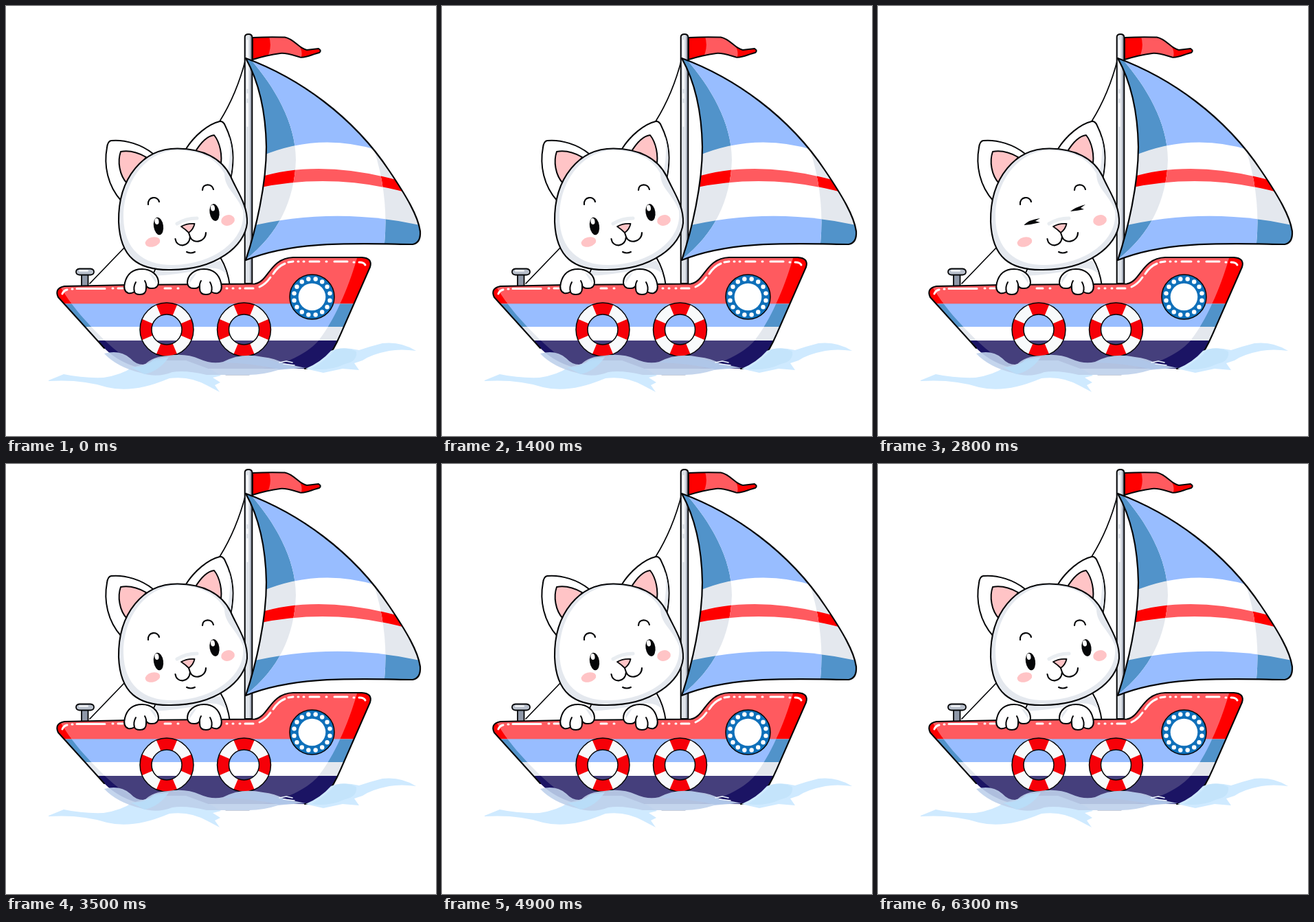
An HTML page with a canvas for the animation above (7000 ms loop, 626 by 626 pixels).

```html
<!DOCTYPE html>
<html lang="en">
<head>
<meta charset="utf-8">
<title>Kitten in a sailing boat</title>
<style>
html, body { margin: 0; width: 100%; height: 100%; overflow: hidden; background: #fff; }
canvas { display: block; }
</style>
</head>
<body>
<canvas id="stage" width="626" height="626"></canvas>
<script>
const ctx = document.getElementById('stage').getContext('2d');
const LOOP = 7000, STEP = 700, LIFT = 33;
const INK = '#050608', GREY = '#e4e8ee', PINK = '#ffc4c6', FOAM = '#cfeaff';
const LIGHT = { red: '#ff5a5f', blue: '#98bdff', white: '#fff', navy: '#453f7c' };
const DARK = { red: '#ff0000', blue: '#5193ca', white: GREY, navy: '#1b1464' };

function fill(d, color) {
  ctx.fillStyle = color;
  ctx.fill(new Path2D(d));
}

function line(d, width = 2, color = INK) {
  ctx.strokeStyle = color;
  ctx.lineWidth = width;
  ctx.stroke(new Path2D(d));
}

function shape(d, color, width = 2) {
  fill(d, color);
  line(d, width);
}

function within(d, draw) {
  ctx.save();
  ctx.clip(new Path2D(d));
  draw();
  ctx.restore();
}

function oval(x, y, rx, ry, tilt, color, edge = 0) {
  ctx.beginPath();
  ctx.ellipse(x, y, rx, ry, tilt, 0, 7);
  ctx.fillStyle = color;
  ctx.fill();
  if (edge) {
    ctx.strokeStyle = INK;
    ctx.lineWidth = edge;
    ctx.stroke();
  }
}

function mast() {
  const d = 'M347.7 404V45Q348 41 353 41Q358 41 358.3 45V404Z';
  fill(d, '#a9b0bd');
  within(d, () => {
    fill('M347 40H355V405H347Z', '#dfe3e9');
    line('M351.5 50V120M351.5 128V134M351.5 142V175', 2, '#fff');
  });
  line(d);
}

function flag() {
  const d = 'M359 46C376 45 392 45 406 45.5C420 48 426 62 438 64L455 62Q460 65 456 68C446 70 437 76 428 74.5' +
    'C416 71 409 68 399 69C384 71 372 74 359 78Z';
  fill(d, LIGHT.red);
  within(d, () => {
    fill('M355 40H381Q390 58 378 80H355Z', DARK.red);
    fill('M426 57Q434 67 428 80H470V57Z', DARK.red);
  });
  line(d);
}

function sailBands(c) {
  fill('M340 70H620V400H340Z', c.white);
  fill('M340 70H560L542 210Q455 183 370 219L340 230Z', c.blue);
  fill('M366 250Q455 222 572 254L585 272Q475 242 366 265Z', c.red);
  fill('M350 322Q480 290 612 321V380H340Z', c.blue);
}

function sail() {
  const d = 'M349 76C425 104 505 160 558 240C583 277 600 306 603 328Q604 345 592 347' +
    'C510 346 420 341 349 370C364 325 379 260 379 205C378 150 368 110 349 76Z';
  within(d, () => {
    sailBands(DARK);
    within('M349 70C388 112 422 168 422 224C420 285 395 335 345 372L560 400' +
      'Q551 350 551 345Q558 270 531 195L540 60Z', () => sailBands(LIGHT));
  });
  line(d, 2.2);
}

function ears() {
  shape('M214 215C198 202 174 194 153 196Q148 197 147 206C142 232 148 262 168 284Z', '#fff');
  shape('M204 220C190 212 178 210 167 212C162 226 165 246 176 258Z', PINK);
  shape('M262 208C274 189 294 172 311 168Q316 167 319 174C332 200 333 224 327 252Z', '#fff');
  fill('M325 190C331 212 330 230 327 248L323 240Q328 214 325 190Z', GREY);
  shape('M275 213C284 198 294 189 303 188C311 198 316 217 312 235Z', PINK);
}

function head() {
  const d = 'M250 207.5C286 208 314 221 327 248C337 271 352 290 351 316C348 349 306 384 240 384' +
    'C192 385 166 366 164 314C163 250 200 207 250 207.5Z';
  fill(d, GREY);
  within(d, () => {
    fill('M250 210C284 211 306 222 318 244C318 266 335 272 345 298C350 340 303 376 244 377' +
      'C201 378 172 356 171 308C171 252 207 210 250 210Z', '#fff');
    line('M249 317Q262 309 278 309', 5, '#e9edf1');
  });
  line(d, 2.1);
}

function eyes(closed) {
  if (closed) {
    fill('M212 319Q220 311 236 309L229 313L236 315Q225 318 212 319Z', INK);
    fill('M280 299Q287 293 302 289L295 294L300 296Q291 298 280 299Z', INK);
    return;
  }
  oval(222, 320.5, 7, 12.8, -0.15, INK);
  oval(219.5, 313.5, 3, 4.5, -0.15, '#fff');
  oval(303.5, 300.5, 7, 12.5, -0.15, INK);
  oval(301, 294, 3, 4.5, -0.15, '#fff');
}

function face(closed) {
  oval(213.5, 343.5, 11, 7, -0.25, PINK);
  oval(323, 312, 10, 7.8, -0.25, PINK);
  line('M207 289C206 277 221 276 223 285M286 268C286 258 300 258 302 267', 2.2);
  eyes(closed);
  shape('M255 321Q264 316 274.5 317Q273 325 266 330Q261 325 255 321Z', PINK, 1.8);
  line('M266 330L268 336M246.5 339C248 352 267 352 268 336C272 347 291 344 291 330M263 358Q269 361 275 358', 2.1);
}

function paw() {
  shape('M204 411Q204 420 195 420Q188 420 187 416Q183 419 178 418Q170 415 173 403C176 391 183 383 198 383' +
    'C212 383 222 392 222 403Q221 412 211 411Q206 411 204 407Z', '#fff');
  fill('M208 388Q220 394 219 404Q214 397 208 388Z', GREY);
  line('M187 416Q185 409 189 402M204 411Q205 405 202 400');
}

function paws() {
  paw();
  ctx.save();
  ctx.translate(486, 0);
  ctx.scale(-1, 1);
  paw();
  ctx.restore();
}

function cleat() {
  shape('M110 391H119.5V408H110Z', '#8f98a8', 1.8);
  shape('M107 382.5H123Q128 383 128 387Q128 391 123 391.5H107Q102 391 102 387Q102 383 107 382.5Z', '#b9c0cc', 1.8);
  line('M107 385.5H119', 2, '#fff');
}

function hullBands(c) {
  [['red', 360, 433.5], ['blue', 433.5, 467], ['white', 467, 487], ['navy', 487, 545]].forEach(([name, top, end]) => {
    ctx.fillStyle = c[name];
    ctx.fillRect(60, top, 490, end - top);
  });
}

function hull() {
  // The rim stays open at the waterline, so no ink shows under the waves.
  const rim = 'M143 498L76 424Q70 411 85 408L180 406L362 404.5C382 402 384 367 418 366H518Q534 367 530 380L487 478' +
    'C474 508 462 527 435 528';
  within(rim + 'H200Q166 521 143 498Z', () => {
    hullBands(DARK);
    within('M74 400C96 440 122 465 145 488C170 512 190 522 220 532H350C405 525 440 505 455 487' +
      'C478 458 500 408 513 360H300Z', () => hullBands(LIGHT));
  });
  line(rim, 2.1);
  line('M82 419Q84 414 89 413M96 412H97M103 411.5H144M155 411H156M163 411H170M231 411H240M250 411H251' +
    'M321 411H322M330 411H331M340 411H341M348 411H360M369 409Q378 405 385 395M389 390Q396 379 406 375M411 373L418 372' +
    'M425 372H426M433 372H434M442 372H456M466 372H467M478 372H497M506 373H507M514 373Q521 373 523 377', 3, '#fff');
}

function ring(x, y) {
  ctx.lineWidth = 17;
  ctx.lineCap = 'butt';
  ctx.strokeStyle = '#f8fafb';
  ctx.beginPath();
  ctx.arc(x, y, 30.5, 0, 7);
  ctx.stroke();
  ctx.strokeStyle = '#f60008';
  for (let i = 0; i < 4; i++) {
    const a = i * Math.PI / 2;
    ctx.beginPath();
    ctx.arc(x, y, 30.5, a - 0.4, a + 0.4);
    ctx.stroke();
  }
  ctx.lineCap = 'round';
  [22, 39].forEach(r => oval(x, y, r, r, 0, 'transparent', 1.5));
}

function porthole(x, y) {
  oval(x, y, 32.5, 32.5, 0, '#0f70ba', 1.5);
  oval(x, y, 19.8, 19.8, 0, '#fff');
  for (let i = 0; i < 16; i++) {
    const a = (i + 0.5) * Math.PI / 8;
    oval(x + 26.5 * Math.cos(a), y + 26.5 * Math.sin(a), 3.2, 3.2, 0, '#fff');
  }
}

function waves() {
  fill('M62 545L84 536Q112 542 142 541Q168 537 184 526L222 516L262 516L300 530L313 538L301 541L312 548L304 552' +
    'L311 562L294 553Q268 538 238 542Q216 551 202 554Q172 561 147 555Q110 543 62 546Z', FOAM);
  fill('M436 528Q458 519 473 502Q490 495 514 501Q532 495 548 491Q575 488 597 502Q575 499 558 502' +
    'Q532 507 519 516L507 520L514 530L490 528L462 534Z', FOAM);
  fill('M445 528Q468 514 480 500Q496 496 510 503Q512 517 494 521Q470 532 445 528Z', '#c4e4fb');
  ctx.globalAlpha = 0.9;
  fill('M143 506Q166 500 181 513Q190 523 202 522Q214 510 236 509Q262 505 282 514Q300 522 316 518Q342 504 374 511' +
    'Q392 513 404 520L436 527Q414 528 396 530Q374 537 354 537H292Q262 530 242 533Q220 542 196 534Q162 526 143 506Z', '#bed1ec');
  fill('M182 526Q202 527 216 514L237 511Q224 531 202 536Z', '#b9defa');
  fill('M316 519Q344 505 376 512Q398 520 426 527L398 529Q360 520 316 519Z', '#b0c7e9');
  ctx.globalAlpha = 1;
  line('M398 519L408 517L417 519M404 521L420 523', 1.5, '#eef7ff');
  line('M320 537.5H354', 1.2, '#c9cfdb');
}

function scene(closed) {
  line('M349 77Q336 128 311 168M122 404L173 351', 1.7);
  mast();
  flag();
  sail();
  cleat();
  shape('M205 410L219 380L312 366Q323 384 326 408Z', '#fff');
  fill('M218 384L312 371Q318 378 321 390Q307 377 285 384Q250 391 214 393Z', GREY);
  ears();
  head();
  face(closed);
  hull();
  paws();
  ring(234, 471);
  ring(346.5, 471);
  porthole(445.5, 423.5);
  waves();
}

function draw(now) {
  const t = now % LOOP;
  const up = Math.floor(t / STEP) % 2 === 1;
  ctx.fillStyle = '#fff';
  ctx.fillRect(0, 0, 626, 626);
  ctx.save();
  ctx.lineCap = ctx.lineJoin = 'round';
  if (up) ctx.translate(0, -LIFT);
  scene(t >= 2800 && t < 3000);
  ctx.restore();
  requestAnimationFrame(draw);
}

draw(0);
</script>
</body>
</html>
```
